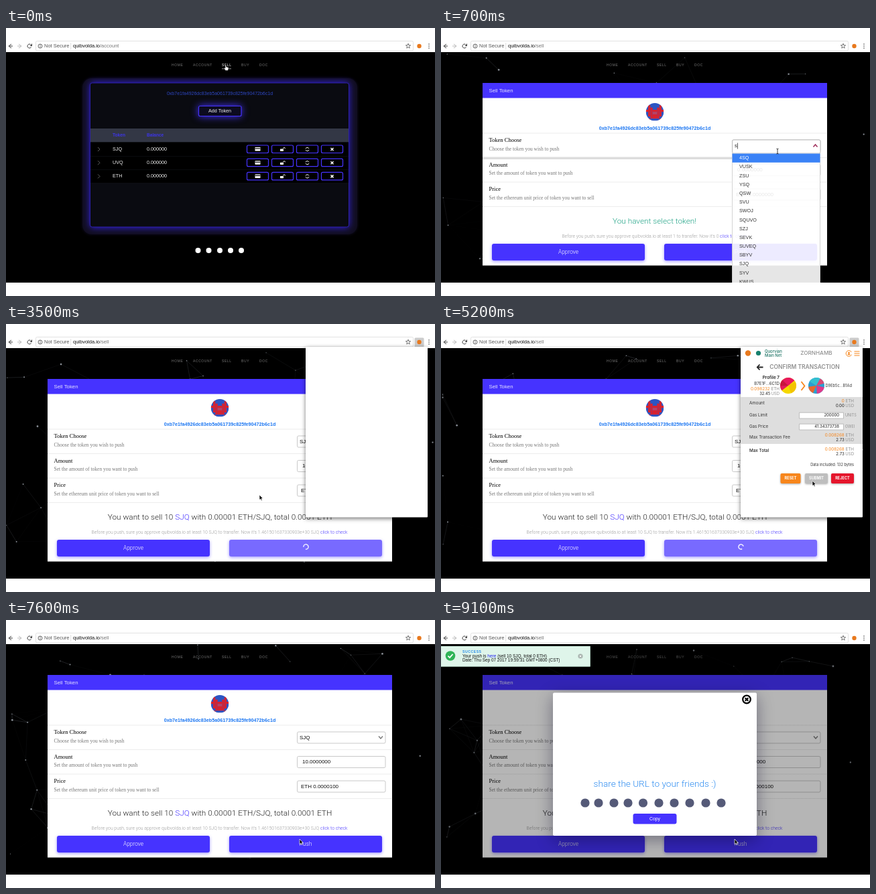
These frames come from a looping animation (640x400 px, 9200 ms). An HTML page with a canvas:

```html
<!DOCTYPE html>
<html lang="en">
<head>
<meta charset="utf-8">
<title>Sell token</title>
<style>
html, body { margin: 0; width: 100%; height: 100%; overflow: hidden; background: #fff; }
canvas { display: block; width: 640px; height: 400px; }
</style>
</head>
<body>
<canvas id="stage" width="640" height="400"></canvas>
<script>
const c = document.getElementById('stage').getContext('2d');
const LOOP = 9200, STEP = 100, TOP = 36;
const VIOLET = '#4633ff', ORANGE = '#f7861c', GREY = '#909090';
const SANS = '"Liberation Sans", Arial, sans-serif';
const SERIF = '"Liberation Serif", Times, serif';
const THIN = 'Roboto, sans-serif';
const ROUND = 'Inter, sans-serif';
const HOST = 'quibvolda.io', COIN = 'SJQ';
const WALLET = '0xb7e1fa4926dc83eb5a061739c825fe90472b6c1d';
const TOKENS = ['4SQ', 'VUSK', 'ZSU', 'YSQ', 'QSW', 'SVU', 'SWOJ', 'SQUVO', 'SZJ', 'SEVK', 'SUVEQ', 'SBYV', COIN, 'SYV', 'KWUS'];

// Moments of the story, in ms
const AT = {
  sell: 200, typed: 500, picked: 900, amount: 1300, price: 2000, push: 3200,
  popup: 3400, confirm: 3800, submitted: 5500, info: 5600, popupEnd: 6900,
  success: 7900, dim: 8200, modal: 8300
};

// time, x, y, shape
const POINTER = [
  [0, 327, 55, 'hand'], [100, 327, 55, 'hand'], [300, 420, 120, 'arrow'], [500, 500, 178, 'beam'],
  [700, 502, 184, 'beam'], [900, 470, 350, 'arrow'], [1200, 500, 212, 'beam'], [1800, 510, 214, 'beam'],
  [2000, 505, 248, 'beam'], [2700, 505, 250, 'beam'], [3200, 446, 332, 'arrow'], [3500, 378, 255, 'arrow'],
  [4300, 378, 255, 'arrow'], [5200, 554, 234, 'arrow'], [5600, 554, 234, 'arrow'], [6700, 429, 64, 'arrow'],
  [7400, 438, 327, 'arrow'], [9200, 438, 327, 'arrow']
];

function rect(x, y, w, h, fill, r = 0) {
  c.fillStyle = fill;
  c.beginPath();
  c.roundRect(x, y, w, h, r);
  c.fill();
}
function frame(x, y, w, h, stroke, r = 2, lw = 1) {
  c.strokeStyle = stroke;
  c.lineWidth = lw;
  c.beginPath();
  c.roundRect(x, y, w, h, r);
  c.stroke();
}
function dot(x, y, r, fill) {
  c.fillStyle = fill;
  c.beginPath();
  c.arc(x, y, r, 0, 7);
  c.fill();
}
function ring(x, y, r, stroke, lw = 1, from = 0, to = 7) {
  c.strokeStyle = stroke;
  c.lineWidth = lw;
  c.beginPath();
  c.arc(x, y, r, from, to);
  c.stroke();
}
function line(points, stroke, lw = 1) {
  c.strokeStyle = stroke;
  c.lineWidth = lw;
  c.beginPath();
  for (let i = 0; i < points.length; i += 2) c.lineTo(points[i], points[i + 1]);
  c.stroke();
}
function shape(points, fill) {
  c.fillStyle = fill;
  c.beginPath();
  for (let i = 0; i < points.length; i += 2) c.lineTo(points[i], points[i + 1]);
  c.fill();
}
function text(s, x, y, font, fill, align = 'left') {
  c.font = font;
  c.fillStyle = fill;
  c.textAlign = align;
  c.fillText(s, x, y);
}
// Coloured pieces on one line: [string, colour, ...]
function runs(parts, x, y, font, anchor = 0) {
  c.font = font;
  const total = parts.reduce((sum, p, i) => i % 2 ? sum : sum + c.measureText(p).width, 0);
  x -= total * anchor;
  for (let i = 0; i < parts.length; i += 2) {
    text(parts[i], x, y, font, parts[i + 1]);
    x += c.measureText(parts[i]).width;
  }
}
function glow(color, blur, dy, draw) {
  c.save();
  c.shadowColor = color;
  c.shadowBlur = blur;
  c.shadowOffsetY = dy;
  draw();
  c.restore();
}
function cross(x, y, r, color, lw) {
  line([x - r, y - r, x + r, y + r], color, lw);
  line([x + r, y - r, x - r, y + r], color, lw);
}
function reload(x, y, r, color, lw) {
  ring(x, y, r, color, lw, 0.5, 5.4);
  shape([x + r + 1, y - r - 1, x + r + 1, y, x + r - 2.4, y], color);
}

// Seeded drifting network
let seed = 29;
const rnd = () => (seed = (seed * 16807) % 2147483647) / 2147483647;
const nodes = Array.from({ length: 56 }, () => ({
  x: rnd() * 640, y: rnd() * 322, vx: (rnd() - 0.5) * 36, vy: (rnd() - 0.5) * 36, r: 0.4 + rnd() * 1.1
}));
function bounce(v, max) {
  v = ((v % (2 * max)) + 2 * max) % (2 * max);
  return v > max ? 2 * max - v : v;
}
function network(t) {
  c.save();
  c.beginPath();
  c.rect(0, TOP, 640, 323);
  c.clip();
  const pts = nodes.map(n => [bounce(n.x + n.vx * t / 1000, 640), 37 + bounce(n.y + n.vy * t / 1000, 322), n.r]);
  pts.forEach((a, i) => {
    for (const b of pts.slice(i + 1)) {
      const d = Math.hypot(a[0] - b[0], a[1] - b[1]);
      if (d < 72) line([a[0], a[1], b[0], b[1]], `rgba(190,200,215,${0.3 * (1 - d / 72)})`, 0.7);
    }
    dot(...a, 'rgba(205,212,222,.65)');
  });
  c.restore();
}

function browser(path, popup) {
  rect(0, 0, 640, TOP, '#fff');
  frame(44.5, 19.5, 563, 14.5, '#e2e2e2', 2);
  line([8, 24, 4, 27, 8, 30], '#444');
  line([4, 27, 10, 27], '#444');
  line([19, 24, 23, 27, 19, 30], '#bbb');
  line([17, 27, 23, 27], '#bbb');
  reload(35, 27, 3, '#444', 1);
  ring(51, 27, 3, '#555', 0.9);
  rect(50.6, 26.5, 0.9, 2.2, '#555');
  rect(50.6, 25, 0.9, 0.9, '#555');
  text('Not Secure', 57, 27.2, '7.5px ' + SANS, '#555');
  rect(96.5, 22, 0.6, 10, '#ccc');
  runs([HOST, '#111', '/' + path, '#777'], 100, 27.2, '7.5px ' + SANS);
  const star = [];
  for (let i = 0; i < 11; i++) {
    const a = i * Math.PI / 5 - Math.PI / 2, r = i % 2 ? 1.6 : 3.8;
    star.push(600 + r * Math.cos(a), 27 + r * Math.sin(a));
  }
  line(star, '#555', 0.8);
  if (popup) rect(609.5, 20.5, 14, 14, '#ccc', 1.5);
  dot(616.5, 27, 3.2, '#e8791e');
  for (const y of [24, 27, 30]) dot(631, y, 0.8, '#444');
}

function nav(active) {
  c.letterSpacing = '0.6px';
  [['HOME', 247], ['ACCOUNT', 279], ['SELL', 322], ['BUY', 351], ['DOC', 378]].forEach(([s, x]) =>
    text(s, x, 56, '5px ' + SANS, s === active ? '#fff' : '#777'));
  c.letterSpacing = '0px';
  if (active) rect(322, 60.5, 14, 0.7, '#ccc');
}

function accountPage() {
  nav('SELL');
  glow('#120e24', 4, 0, () => rect(114, 75, 410, 233, '#110e20', 14));
  glow('#3a28ff', 11, 0, () => rect(126, 82, 385, 215, '#0a0b11', 3));
  frame(125.5, 82, 386, 215, '#2c1fa8', 3);
  text(WALLET, 319, 98, '7px ' + SANS, '#2d46c0', 'center');
  glow('#4633ff', 12, 0, () => rect(287, 116, 64, 16, '#0c0b20', 2));
  frame(287.5, 116.5, 63.5, 15, VIOLET, 2, 1.2);
  text('Add Token', 319, 124.2, '7.2px ' + SANS, '#eee', 'center');
  rect(126, 150, 385, 20.5, '#333745');
  text('Token', 159, 160.5, 'bold 6.6px ' + SANS, '#3d35e6');
  text('Balance', 210, 160.5, 'bold 6.6px ' + SANS, '#3d35e6');
  rect(126, 170.5, 385, 61, '#000');
  [COIN, 'UVQ', 'ETH'].forEach((s, i) => {
    const y = 181 + i * 20.2;
    rect(126, y + 10, 385, 0.5, '#15161d');
    line([137, y - 3, 140, y, 137, y + 3], '#777', 0.8);
    text(s, 159, y, '7.2px ' + SANS, '#eee');
    text('0.000000', 210, y, '7.2px ' + SANS, '#eee');
    for (let k = 0; k < 4; k++) frame(359.5 + k * 37, y - 6, 32, 11.5, VIOLET, 2, 1.2);
    rect(371.5, y - 3, 8, 5.5, '#fff', 0.6);
    rect(371.5, y - 1.6, 8, 1.2, '#000');
    rect(409, y - 0.5, 5, 3.3, '#fff', 0.4);
    ring(415, y - 1, 1.5, '#fff', 0.9, 3.1, 6.3);
    ring(449.5, y, 2.6, '#fff', 1, 0.3, 2.8);
    ring(449.5, y, 2.6, '#fff', 1, 3.5, 5.9);
    cross(486.5, y, 2, '#fff', 1.5);
  });
  for (const x of [286.5, 302.5, 319, 335, 351]) dot(x, 332, 4, '#fff');
}

function identicon(x, y, r) {
  c.save();
  c.beginPath();
  c.arc(x, y, r, 0, 7);
  c.clip();
  rect(x - r, y - r, 2 * r, 2 * r, '#2b55c4');
  const u = r / 4;
  // Mirrored rows as bit masks
  [0, 4, 6, 15, 7, 7, 3, 4].forEach((bits, row) => {
    for (let k = 0; k < 4; k++) if (bits >> k & 1) {
      rect(x + k * u, y - r + row * u, u, u, '#d8222f');
      rect(x - (k + 1) * u, y - r + row * u, u, u, '#d8222f');
    }
  });
  rect(x - u, y, 2 * u, u, '#b4456a');
  c.restore();
}

function button(x, label, busy, t) {
  glow('rgba(70,51,255,.5)', 4, 1.5, () => rect(x, 322, 228, 25, busy ? '#786aff' : VIOLET, 3));
  if (busy) {
    const a = t / 160;
    ring(x + 114.5, 332.5, 3.6, '#fff', 1.3, a, a + 5);
  } else text(label, x + 114, 334.3, '300 8.4px ' + THIN, '#fff', 'center');
}

function field(y, value, x) {
  rect(434.5, y, 131.5, 17, '#fff', 2);
  frame(434.5, y, 131.5, 17, '#bbb', 2, 0.8);
  text(value, x, y + 8.7, '8px ' + SANS, '#111');
}

function typed(full, start, gap, t) {
  return full.slice(0, Math.max(0, Math.floor((t - start) / gap) + 1));
}

function sellPage(t) {
  network(t);
  nav();
  rect(62, 82, 514, 272.5, '#fff');
  rect(62, 82, 514, 22.5, VIOLET);
  text('Sell Token', 71.5, 93.5, '7.8px ' + SANS, '#e4e2ff');
  identicon(319, 125.3, 13.3);
  text(WALLET, 319, 150.5, 'bold 7.2px ' + SANS, '#1b76f2', 'center');
  c.setLineDash([1, 1]);
  for (const y of [157, 193.5, 230, 266.5]) line([62, y, 576, y], '#ccc', 0.7);
  c.setLineDash([]);
  [['Token Choose', 'Choose the token you wish to push'],
   ['Amount', 'Set the amount of token you want to push'],
   ['Price', 'Set the ethereum unit price of token you want to sell']].forEach(([a, b], i) => {
    const y = 168 + i * 36.4;
    text(a, 71.5, y, '8.5px ' + SERIF, '#000');
    text(b, 71.5, y + 13, '7.5px ' + SERIF, '#777');
  });

  const picked = t >= AT.picked, open = t >= AT.typed - 100 && !picked;
  const amount = Number(typed('10', AT.amount, 200, t));
  const price = Number(typed('0.00001', AT.price, 100, t));
  field(167, picked ? COIN : '', 438);
  field(203.5, amount.toFixed(7), 442);
  field(240, 'ETH ' + price.toFixed(7), 440);
  line([556, 173.5, 559, 177, 562, 173.5], '#777', 1.4);

  const big = '300 11.8px ' + THIN, small = '300 6.85px ' + THIN;
  const trim = n => n ? n.toFixed(7).replace(/0+$/, '') : '0';
  if (picked) {
    runs(['You want to sell ' + amount + ' ', '#222', COIN, VIOLET,
      ` with ${trim(price)} ETH/${COIN}, total ${trim(amount * price)} ETH`, '#222'], 319, 289, big, 0.5);
  } else text('You havent select token!', 318.5, 289, big, '#20a386', 'center');
  const need = picked ? amount + ' ' + COIN : '1';
  const now = picked ? '1.461501637330903e+30 ' + COIN : '0';
  runs([`Before you push, sure you approve ${HOST} at least ${need} to transfer. Now it's ${now} `, '#999',
    'click to check', VIOLET], 318.5, 310.5, small, 0.5);
  button(76, 'Approve');
  button(333, 'Push', t >= AT.push && t < AT.info, t);
  if (open) dropdown(t);
}

function dropdown(t) {
  rect(62, 192.5, 372, 3.5, '#ddd');
  rect(434.5, 167, 131.5, 20, '#fff', 2);
  frame(434.5, 167, 131.5, 20, '#aaa', 2, 0.8);
  if (t >= AT.typed) text('s', 438, 176, '7.5px ' + SANS, '#222');
  rect(t >= AT.typed ? 442 : 438, 171.5, 0.7, 9, '#222');
  line([555.5, 177.5, 558.5, 174, 561.5, 177.5], '#a0305c', 1.5);
  c.save();
  c.beginPath();
  c.rect(434, 187, 132, 193);
  c.clip();
  rect(434, 187, 132, 193, 'rgba(255,255,255,.9)');
  frame(434.4, 187, 131.2, 210, '#bbb', 0, 0.7);
  rect(434.5, 187.5, 131, 13.2, '#3a82f6');
  TOKENS.forEach((s, i) => text(s, 445, 194.3 + i * 13.18, '7.2px ' + SANS, i ? '#333' : '#fff'));
  c.restore();
}

function pie(x, y, r, base, slices) {
  dot(x, y, r, base);
  for (const [from, to, fill] of slices) {
    c.fillStyle = fill;
    c.beginPath();
    c.moveTo(x, y);
    c.arc(x, y, r, from, to);
    c.fill();
  }
}
function tag(x, y, w, h, label, fill) {
  glow('rgba(0,0,0,.35)', 3, 1, () => rect(x, y, w, h, fill, 2));
  text(label, x + w / 2, y + h / 2 + 0.3, 'bold 5.6px ' + ROUND, '#fff', 'center');
}

function walletHead() {
  dot(458, 43.5, 4.2, '#e8791e');
  dot(473.5, 43.5, 3.6, '#17806d');
  text('Quorvian', 483, 41.2, '500 5.9px ' + ROUND, '#1f7466');
  text('Main Net', 483, 47, '500 5.9px ' + ROUND, '#1f7466');
  text('ZORNHAMB', 560, 43.8, '500 8.2px ' + ROUND, GREY, 'center');
  ring(608.5, 44, 4.3, ORANGE, 1, 0.4, 5.8);
  dot(608.5, 43, 1.3, ORANGE);
  rect(606.6, 44.5, 3.8, 1.8, ORANGE, 1);
  for (const y of [41, 44, 47]) rect(616.5, y - 0.6, 8, 1.2, ORANGE);
}

function confirmView(t) {
  const f = s => s + 'px ' + ROUND;
  line([480.5, 64.5, 472, 64.5], '#222', 1.8);
  line([475.5, 60.5, 471.8, 64.5, 475.5, 68.5], '#222', 1.8);
  text('CONFIRM TRANSACTION', 542.5, 64.8, '600 8.5px ' + ROUND, GREY, 'center');
  text('Profile 7', 505, 80.5, '600 6.4px ' + ROUND, '#222', 'right');
  text('B7E1F...6C1D', 505, 89, f(6.2), '#333', 'right');
  runs(['0.098232', ORANGE, ' ETH', GREY], 505, 97, f(6.3), 1);
  runs(['32.45', '#222', ' USD', GREY], 505, 104, f(5.8), 1);
  pie(518, 92, 12, '#f5d800', [[-0.5, 1.2, '#f2c400'], [2.5, 5.6, '#e8175d'], [3.1, 3.9, '#c8143c']]);
  line([537.5, 86, 542.5, 92.5, 537.5, 99], ORANGE, 1.8);
  pie(560, 92, 12, '#2a9fd0', [[0.2, 1.5, '#e0398a'], [2, 3, '#e8682c'], [3.7, 5.2, '#35bfd0'], [5.2, 6, '#d94a74']]);
  text('D9Eb5c...B1Ad', 573.5, 92, f(5.7), '#333');

  rect(447, 109, 182, 70, '#dedede');
  const row = (s, y) => text(s, 460, y, f(6.2), '#333');
  const sum = (a, b, y) => {
    runs([a, ORANGE, ' ETH', GREY], 616, y, f(6.3), 1);
    runs([b, '#222', ' USD', GREY], 616, y + 7, f(6), 1);
  };
  row('Amount', 118);
  sum('0', '0.00', 115);
  row('Gas Limit', 136);
  row('Gas Price', 153);
  [['200000', 'UNITS', 136.5], ['41.34373738', 'GWEI', 153.5]].forEach(([n, unit, y]) => {
    rect(534.5, y - 4.3, 66, 8.8, '#fff');
    frame(534.5, y - 4.3, 66, 8.8, '#aaa', 0, 0.7);
    text(n, 594, y + 0.2, f(6), '#222', 'right');
    text(unit, 603, y - 0.3, f(5.5), GREY);
  });
  row('Max Transaction Fee', 169);
  sum('0.008268', '2.73', 166.5);
  text('Max Total', 460, 189.5, '500 6.3px ' + ROUND, '#222');
  sum('0.008268', '2.73', 187.5);
  text('Data included: 132 bytes', 616, 210.5, f(5.6), '#333', 'right');
  tag(506.5, 223, 30, 15, 'RESET', ORANGE);
  tag(543, 223, 34, 15, 'SUBMIT', t >= 5100 ? '#bebebe' : ORANGE);
  tag(582, 223, 34, 15, 'REJECT', '#e5162c');
}

function historyView() {
  const f = s => s + 'px ' + ROUND;
  pie(473, 79, 16, '#f5d800', [[-0.5, 0.7, '#f0bc00'], [2.7, 5.2, '#ec1760'], [0.7, 2.7, '#d8103a'], [5.2, 5.8, '#f2cf00']]);
  text('Profile 7', 497, 77, '500 10.6px ' + ROUND, '#174b50');
  text('0xB7e1...', 497, 88, f(6.2), '#999');
  for (const x of [597, 601.2, 605.4]) dot(x, 76, 1.6, '#222');
  runs(['0.098232', ORANGE, ' ETH', GREY], 457.5, 107, f(7.3));
  runs(['32.45', '#222', ' USD', GREY], 478, 113.5, f(5.7));
  tag(558, 98, 23, 15, 'BUY', ORANGE);
  tag(586, 98, 28.5, 15, 'SEND', ORANGE);
  rect(447, 124, 91, 14, '#f4f4f4');
  rect(538, 124, 91, 14, '#dcdcdc', [5, 0, 0, 0]);
  text('SENT', 493, 131.2, '500 7.4px ' + ROUND, GREY, 'center');
  text('TOKENS', 583, 131.2, '500 7.4px ' + ROUND, GREY, 'center');

  const to = '0xD9Eb5c7...B1Ad';
  [['19:58', to, ''], ['19:56', to, ' (Rejected)'], ['19:50', '0x41D7C26...9B30', '']].forEach(([clock, addr, note], i) => {
    const y = 153.5 + i * (i > 1 ? 54.2 : 55);
    text('September 07 2017', 528, y, '500 7.9px ' + ROUND, '#333', 'center');
    text(clock, 528, y + 11.5, '500 7.9px ' + ROUND, '#333', 'center');
    runs([addr, '#666', note, '#d0142c'], 528, y + 23, (note ? '500 ' : '') + '5px ' + ROUND, 0.5);
    rect(580, y + 8, 5.5, 7.5, ORANGE, 0.8);
    rect(583, y + 10.5, 5, 6, '#fff');
    frame(583, y + 10.5, 5, 6, ORANGE, 0.5, 0.9);
    runs(['0', ORANGE, ' ETH', GREY], 598, y + 12.3, f(6.3));
  });
  c.setLineDash([1.5, 1.5]);
  for (const y of [193, 246.5]) line([457, y, 619, y], '#bbb', 0.7);
  c.setLineDash([]);
  for (const x of [459, 463, 467]) dot(x, 165.5, 1.5, '#333');
  text('1', 473, 165.5, f(7.5), '#333');
  shape([463.5, 213.5, 469.5, 224.5, 457.5, 224.5], '#f5a01f');
  rect(463, 217, 1.2, 4, '#fff');
  rect(463, 222, 1.2, 1.2, '#fff');
  pie(463.5, 273.5, 6.2, '#1c2a7c', [[0.5, 1.5, '#3b2a90'], [3, 4, '#122058']]);
}

function walletPopup(t) {
  glow('rgba(0,0,0,.55)', 6, 2, () => rect(447, 34, 182, 254.5, '#fff', 1));
  if (t < AT.confirm) return;
  c.save();
  c.beginPath();
  c.rect(447, 34, 182, 254.5);
  c.clip();
  walletHead();
  if (t < AT.submitted) confirmView(t);
  else historyView();
  c.restore();
}

function infoToast() {
  rect(415, 39, 225, 36, '#e2eafb');
  dot(428, 56, 7, '#000');
  rect(426.9, 55, 2.3, 5, '#fff');
  dot(428, 52.5, 1.3, '#fff');
}

function successToast() {
  rect(0, 39, 222.5, 30.5, '#dff5ea');
  frame(0, 39.4, 222.5, 29.8, '#bfe3d2', 0, 0.7);
  dot(14, 53.5, 7.3, '#2fb457');
  line([10.5, 53.7, 13, 56.2, 17.6, 51], '#fff', 1.8);
  c.letterSpacing = '0.5px';
  text('SUCCESS', 32, 47.8, 'bold 5.2px ' + SANS, '#2a8de8');
  c.letterSpacing = '0px';
  runs(['Your push is ', '#111', 'here', '#2222ee', ` (sell 10 ${COIN}, total 0 ETH)`, '#111'], 32, 54, '6.5px ' + SANS);
  text('Date: Thu Sep 07 2017 19:59:31 GMT+0800 (CST)', 32, 60.2, '6.4px ' + SANS, '#111');
  dot(208, 54, 3.6, '#aab5b0');
  cross(208, 54, 1.3, '#fff', 0.9);
}

function shareModal(t) {
  const p = Math.min(1, (t - AT.modal) / 100);
  c.save();
  c.translate(319, 217);
  c.scale(0.46 + 0.54 * p, 0.46 + 0.54 * p);
  c.translate(-319, -217);
  if (p === 1) {
    glow('rgba(10,8,40,.4)', 24, 6, () => rect(167, 108.5, 304, 213.5, '#fff', 2));
    text('share the URL to your friends :)', 319, 245, '300 13.6px ' + THIN, '#2f8df0', 'center');
    for (const x of [215, 235, 258, 279, 301.5, 325, 348, 371, 395, 418]) dot(x, 273, 6.6, '#555a78');
    rect(286.5, 289, 65, 15.5, VIOLET, 3);
    text('Copy', 319, 297, '6.8px ' + SANS, '#fff', 'center');
  }
  c.globalAlpha = 0.2 + 0.8 * p;
  ring(456, 118.5, 5.8, '#000', 2.2);
  cross(456, 118.5, 2.3, '#000', 2.2);
  c.restore();
}

function pointer(t) {
  let i = 0;
  while (i < POINTER.length - 2 && POINTER[i + 1][0] <= t) i++;
  const [t0, x0, y0, kind] = POINTER[i], [t1, x1, y1] = POINTER[i + 1];
  const k = (t - t0) / (t1 - t0);
  c.save();
  c.translate(x0 + (x1 - x0) * k, y0 + (y1 - y0) * k);
  if (kind === 'beam') {
    line([0, -3.5, 0, 3.5], '#222', 0.9);
    line([-1.6, -4, 0, -3.3, 1.6, -4], '#222', 0.8);
    line([-1.6, 4, 0, 3.3, 1.6, 4], '#222', 0.8);
  } else {
    const p = kind === 'hand'
      ? [0, 0, 1.5, 0, 1.8, 3, 5, 3.8, 5, 6, 4, 8.5, 0.6, 8.5, -2, 5, -1, 4.2, 0, 5, 0, 0]
      : [0, 0, 0, 7.6, 1.7, 6.1, 2.9, 8.8, 4.2, 8.2, 3, 5.6, 5.3, 5.5, 0, 0];
    shape(p, kind === 'hand' ? '#fff' : '#000');
    line(p, kind === 'hand' ? '#222' : '#fff', 0.7);
  }
  c.restore();
}

function draw(t) {
  const popup = t >= AT.popup && t < AT.popupEnd;
  const opening = t >= AT.dim && t <= AT.modal;
  c.textBaseline = 'middle';
  rect(0, 0, 640, 400, '#fff');
  rect(0, TOP, 640, 380 - TOP, '#000');
  if (t < AT.sell) accountPage();
  else sellPage(t);
  if (t >= AT.dim) rect(0, TOP, 640, 380 - TOP, 'rgba(0,0,0,.29)');
  if (opening) rect(636, TOP, 3.5, 343, '#808080', 1.5);
  browser(t < AT.sell ? 'account' : 'sell', popup);
  if (t >= AT.info && t < AT.popupEnd) infoToast();
  if (t >= AT.success) successToast();
  if (t >= AT.modal) shareModal(t);
  if (popup) walletPopup(t);
  if (!opening) pointer(t);
}

const begin = performance.now();
function tick() {
  const t = (performance.now() - begin) % LOOP;
  draw(Math.floor(t / STEP) * STEP);
  requestAnimationFrame(tick);
}
tick();
</script>
</body>
</html>
```
